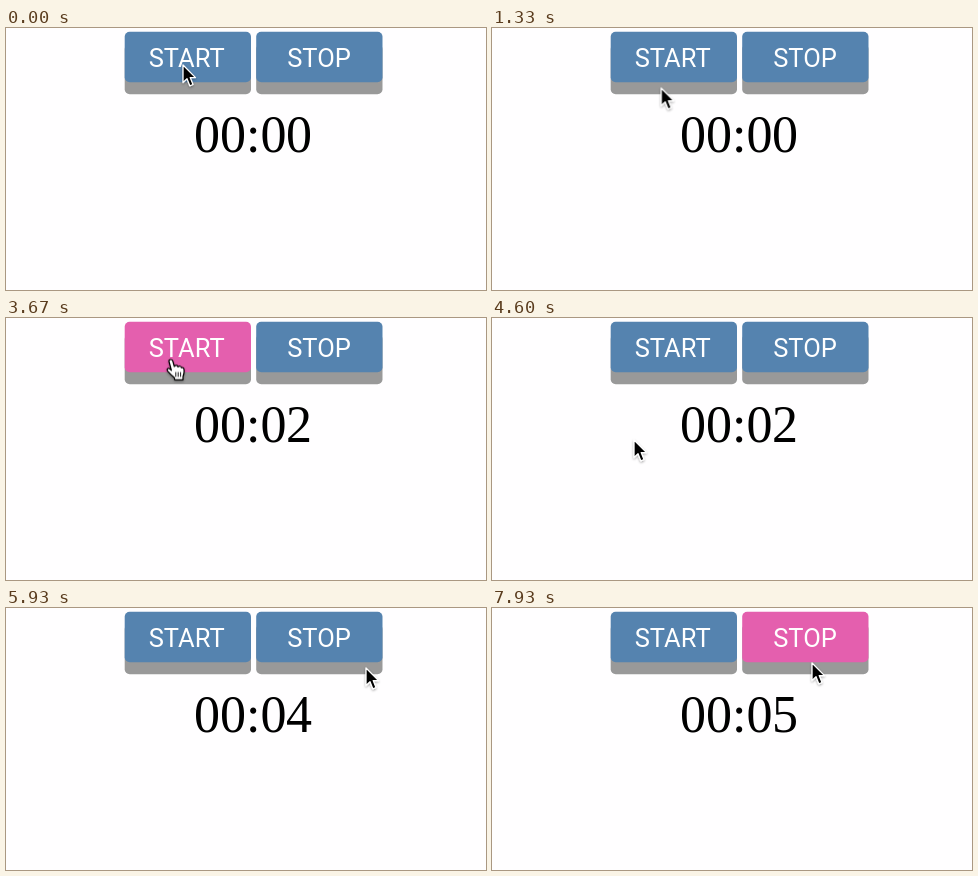
Recreate the animation shown at these times as an HTML page. Size 480x262 px, loop 8 s.

```html
<!DOCTYPE html>
<html lang="en">
<head>
<meta charset="utf-8">
<title>Stopwatch</title>
<style>
  html, body { margin: 0; width: 100%; height: 100%; overflow: hidden; background: #fffeff; }
  svg { display: block; width: 480px; height: 262px; }

  .label { font: 25.5px Roboto, "Open Sans", sans-serif; fill: #fff; text-anchor: middle; }
  .time { font: 52px "Liberation Serif", "Noto Serif", serif; fill: #000; }
  .base { fill: #999; }
  .face { fill: #5583af; }

  .face, .base, .press, .strip, .arrow, .hand { animation: 8s step-end infinite; }
  .start .face { animation-name: hover-start; }
  .stop .face { animation-name: hover-stop; }
  .start .press { animation-name: press-start; }
  .stop .press { animation-name: press-stop; }
  .start .base { animation-name: base-start; }
  .stop .base { animation-name: base-stop; }
  .strip { animation-name: count; }
  .hand { animation-name: hand; }
  .arrow { animation-name: arrow; }
  .cursor { animation: move 8s linear infinite; }

  @keyframes hover-start {
    0%, 15%, 53.9% { fill: #5583af; }
    9.1%, 17% { fill: #e45fae; }
    100% { fill: #5583af; }
  }
  @keyframes hover-stop {
    0% { fill: #5583af; }
    75.5%, 100% { fill: #e45fae; }
  }
  @keyframes press-start {
    0%, 20.9%, 100% { transform: translateY(0); }
    18.4% { transform: translateY(5.3px); }
  }
  @keyframes press-stop {
    0%, 90.8%, 100% { transform: translateY(0); }
    87.5% { transform: translateY(5.3px); }
  }
  @keyframes base-start {
    0%, 20.9%, 100% { fill: #999; }
    18.4% { fill: #666; }
  }
  @keyframes base-stop {
    0%, 90.8%, 100% { fill: #999; }
    87.5% { fill: #666; }
  }
  @keyframes count {
    0% { transform: translateY(0); }
    33.35% { transform: translateY(-60px); }
    45.85% { transform: translateY(-120px); }
    58.35% { transform: translateY(-180px); }
    70.85% { transform: translateY(-240px); }
    83.35%, 100% { transform: translateY(-300px); }
  }
  @keyframes hand {
    0%, 15%, 53.9%, 98.6%, 100% { opacity: 0; }
    9.1%, 17%, 75.5% { opacity: 1; }
  }
  @keyframes arrow {
    0%, 15%, 53.9%, 98.6%, 100% { opacity: 1; }
    9.1%, 17%, 75.5% { opacity: 0; }
  }
  @keyframes move {
    0%, .85% { transform: translate(177px, 37px); }
    2.5% { transform: translate(225px, 78px); }
    4.1% { transform: translate(264px, 87px); }
    5.9% { transform: translate(120px, 80px); }
    7.5% { transform: translate(2px, 72px); }
    9.1% { transform: translate(140px, 48px); }
    10%, 10.8% { transform: translate(155px, 43px); }
    11.6%, 13.3% { transform: translate(157px, 40px); }
    15.9% { transform: translate(172px, 74px); }
    17.5% { transform: translate(166px, 44px); }
    18.4%, 51.6% { transform: translate(165px, 41.5px); }
    54.2% { transform: translate(160px, 70px); }
    57.4%, 61.7% { transform: translate(142px, 122px); }
    66.6%, 69.2% { transform: translate(150px, 150px); }
    74%, 74.6% { transform: translate(360px, 60px); }
    77.5%, 97.6% { transform: translate(311px, 41px); }
    98.9%, 100% { transform: translate(320px, 55px); }
  }
</style>
</head>
<body>
<svg viewBox="0 0 480 262">
  <defs>
    <clipPath id="window"><rect x="272" y="82" width="40" height="50"/></clipPath>
    <filter id="soft" x="-50%" y="-50%" width="200%" height="200%">
      <feDropShadow dx="0" dy="1.2" stdDeviation="1" flood-opacity=".35"/>
    </filter>
  </defs>

  <g class="start">
    <rect class="base" x="118.7" y="16" width="126.3" height="50.3" rx="5"/>
    <g class="press">
      <rect class="face" x="118.7" y="3.7" width="126.3" height="50.6" rx="5"/>
      <text class="label" x="180.7" y="38.5">START</text>
    </g>
  </g>
  <g class="stop">
    <rect class="base" x="250.2" y="16" width="126.3" height="50.3" rx="5"/>
    <g class="press">
      <rect class="face" x="250.2" y="3.7" width="126.3" height="50.6" rx="5"/>
      <text class="label" x="313" y="38.5">STOP</text>
    </g>
  </g>

  <g class="time">
    <text x="188" y="124">00:0</text>
    <g clip-path="url(#window)">
      <g class="strip">
        <text x="280" y="124">0</text>
        <text x="280" y="184">1</text>
        <text x="280" y="244">2</text>
        <text x="280" y="304">3</text>
        <text x="280" y="364">4</text>
        <text x="280" y="424">5</text>
      </g>
    </g>
  </g>

  <g class="cursor">
    <g class="arrow" filter="url(#soft)">
      <path d="M0 0V17.5L4 13.8L6.8 20.8L10 19.5L7.2 12.6H12.5Z"
        fill="#000" stroke="#fff" stroke-width="1.3" stroke-linejoin="round"/>
    </g>
    <g class="hand" filter="url(#soft)" fill="#fff" stroke="#000" stroke-width="1.2" stroke-linejoin="round" stroke-linecap="round">
      <path d="M-2 2Q-2.2 0 -.3 0Q1.4 0 1.8 1.6L3.3 7Q4 5.7 5.5 5.9Q6.8 6.1 7 7.3Q8 6.2 9.2 6.7Q10.2 7 10.4 8.2Q12.4 7.6 12.9 9.4Q13.6 13.4 12 17V20.3H3.8L3.2 18Q-.5 15 -3.3 11.6Q-4.5 9.7 -3 9Q-1.6 8.6 .4 10.8Z"/>
      <path d="M4.8 13V17M7.2 13V17M9.6 13V17" fill="none" stroke-width=".9"/>
    </g>
  </g>
</svg>
</body>
</html>
```
